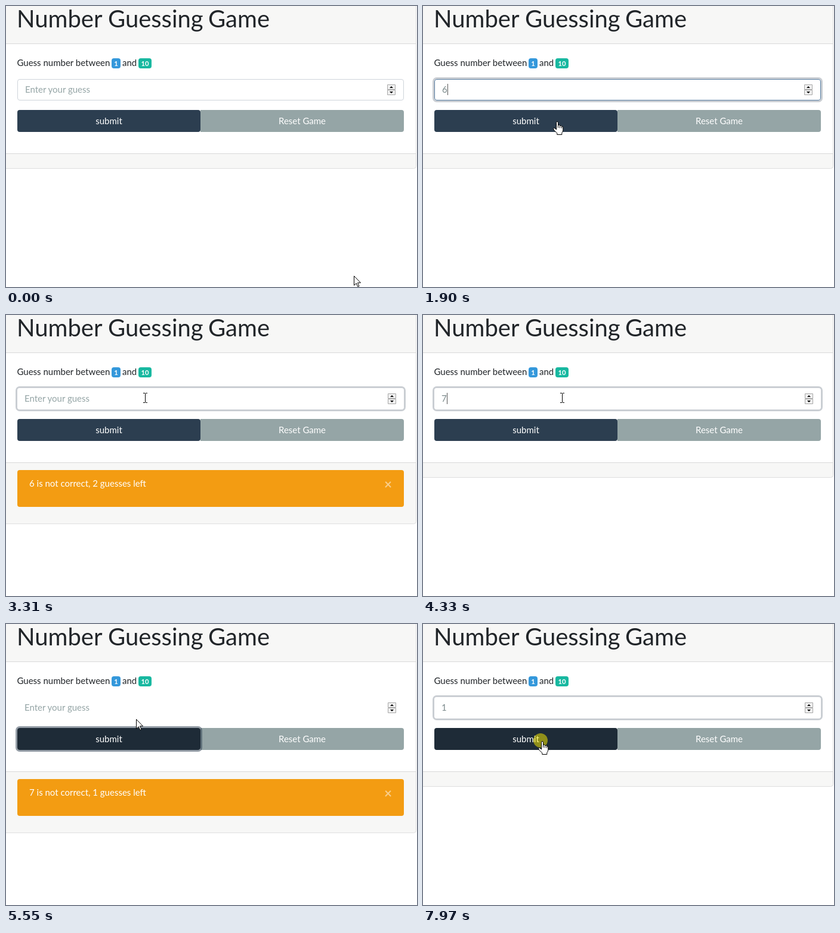
Write an HTML page that moves like this. It is 689 px wide and 473 px high and loops after 8 s.

```html
<!DOCTYPE html>
<html lang="en">
<head>
<meta charset="utf-8">
<title>Number Guessing Game</title>
<style>
  html, body { margin: 0; height: 100%; overflow: hidden; background: #fff; }
  svg { display: block; font: 15px Lato, sans-serif; fill: #212529; }
  .title { font-size: 40px; }
  .badge { font-size: 11.25px; font-weight: 700; }
  .close { font-size: 22.5px; font-weight: 700; opacity: .5; }
  .light { fill: #fff; }
  .mid { text-anchor: middle; }
  .ring { fill: none; stroke: #2c3e50; stroke-width: 3; }
  .cursor { fill: #fff; stroke: #000; stroke-linejoin: round; }
</style>
</head>
<body>
<svg width="689" height="473" viewBox="0 0 689 473">
  <rect id="card" x="-10" y="-20" width="697.5" rx="4" fill="#f7f7f6" stroke="#dfdfdf"/>
  <path d="M0 63.5H687M0 248.5H687" stroke="#d9d9d9"/>
  <rect y="64" width="687" height="184" fill="#fff"/>

  <g class="title">
    <text x="18" y="36">Number</text>
    <text x="171" y="36">Guessing</text>
    <text x="339" y="36">Game</text>
  </g>

  <text x="18.5" y="101">Guess number between</text>
  <rect x="177" y="88" width="15" height="17" rx="4" fill="#3498db"/>
  <text class="badge light mid" x="184.5" y="101">1</text>
  <text x="195" y="101">and</text>
  <rect x="222" y="88" width="22" height="17" rx="4" fill="#18b8a0"/>
  <text class="badge light mid" x="233" y="101">10</text>

  <rect id="inputRing" class="ring" x="17.5" y="121.5" width="651" height="39" rx="5.5"/>
  <rect id="box" x="19.5" y="123.5" width="647" height="35" rx="3.5" fill="#fff"/>
  <g id="field">
    <text id="entry" x="32" y="146"></text>
    <rect id="caret" y="131" width="1" height="19" fill="#555"/>
    <g fill="#f0f0f0" stroke="#a8a8a8">
      <path d="M639.5 132.5h13v8h-13zM639.5 141.5h13v8h-13z"/>
    </g>
    <path d="M643 138h6l-3-3zM643 144h6l-3 3z" fill="#000"/>
  </g>

  <path d="M326 175h337a4 4 0 0 1 4 4v29a4 4 0 0 1 -4 4h-337z" fill="#95a5a6"/>
  <text class="light mid" x="496.5" y="199">Reset Game</text>
  <rect id="btnRing" class="ring" x="17.5" y="173.5" width="310" height="40" rx="5.5"/>
  <rect id="btn" x="19" y="175" width="307" height="37" rx="4"/>
  <text class="light mid" x="172.5" y="199">submit</text>

  <g id="alert">
    <rect x="19" y="261" width="648" height="62" rx="4" fill="#f39c12"/>
    <text id="message" class="light" x="39" y="289"></text>
    <text class="close light mid" x="640.5" y="293">×</text>
  </g>

  <circle id="click" r="12" fill="#faeb00" fill-opacity=".52"/>
  <g id="arrow" class="cursor">
    <path d="M.5 .5V16.2L4.2 12.8L6.8 18.5L9 17.5L6.5 11.9H11.5Z"/>
  </g>
  <g id="beam" stroke="#000" fill="none">
    <path d="M-3 -7.5H0M1 -7.5H4M-3 8.5H0M1 8.5H4M.5 -7V8"/>
  </g>
  <g id="hand" class="cursor">
    <path transform="translate(-4 1)" d="M5.5 13V2.5q0-2 1.5-2t1.5 2V6.5q3-1 3 1q3-.8 3 1.2q2.3-.5 2.3 1.8V14.500q0 3-2 5v3h-8v-2.500L2 15.500q-2-3-1-4t4.500 2.500zM8.500 6.500v4.500M11.500 7.500v4M14.500 8.700v3"/>
  </g>
</svg>
<script>
const LOOP = 8000, STEP = 76.5, FADE = 150;
const $ = id => document.getElementById(id);
const within = (t, spans) => spans.find(([from, to]) => t >= from && t < to);
const show = (id, on) => $(id).style.display = on ? '' : 'none';
const easeOut = u => 1 - (1 - u) ** 3;
const smooth = u => u * u * (3 - 2 * u);

// start time, number of steps, end point, easing
const moves = [
  [70, 7, 231, 141, smooth],
  [1830, 1, 227, 168], [1900, 1, 222, 193], [1980, 1, 222, 195],
  [2360, 4, 233, 139],
  [4400, 4, 221, 187],
  [5550, 1, 218, 160], [5630, 3, 219, 147],
  [7510, 3, 197, 196]
];
const clicks = [600, 2130, 2760, 4790, 5940, 7970].map(t => [t, t + FADE]);
const inputFocus = [[600, 2130], [2760, 4790], [5940, 9000]];
const btnFocus = [[2130, 2760], [4790, 5940]];
const carets = [[600, 1210], [1740, 2130], [2760, 3310], [3840, 4400], [5940, 6490], [7020, 7585]];
const entries = [[1670, 2280, 6], [4160, 4870, 7], [7340, 9000, 1]];
const alerts = [[2280, 4330, 6, 2], [4870, 6870, 7, 1]];

function pointer(t) {
  let x = 583, y = 454;
  for (const [start, steps, toX, toY, ease = easeOut] of moves) {
    if (t < start) break;
    const done = Math.min(steps, Math.floor((t - start + 8) / STEP) + 1);
    const u = ease(done / steps);
    x += (toX - x) * u;
    y += (toY - y) * u;
  }
  return [Math.round(x), Math.round(y)];
}

const inside = ([x, y], left, top, right, bottom) =>
  x >= left && x < right && y >= top && y < bottom;

// Strength of a focus ring that fades in and out
function glow(t, spans) {
  return Math.max(0, ...spans.map(([from, to]) =>
    Math.min(1, (t - from) / FADE, 1 - (t - to) / FADE)));
}

function draw(t) {
  const alert = within(t, alerts);
  show('alert', alert);
  if (alert) $('message').textContent = `${alert[2]} is not correct, ${alert[3]} guesses left`;
  $('card').setAttribute('height', alert ? 371.5 : 293.5);

  const entry = within(t, entries);
  const plain = t >= 2280;
  $('entry').textContent = entry ? entry[2] : 'Enter your guess';
  $('entry').style.fill = entry ? '#7b8a8b' : '#95a5a6';
  $('field').setAttribute('transform', `translate(${plain ? -1 : 0} 0)`);
  $('field').lastElementChild.setAttribute('transform', `translate(${plain ? 2 : 0} 0)`);
  $('field').children[2].setAttribute('transform', `translate(${plain ? 2 : 0} 0)`);
  $('caret').setAttribute('x', entry ? 41 : 32);
  show('caret', within(t, carets));
  $('box').style.stroke = plain ? '#fff' : within(t, inputFocus) ? '#597ea2' : '#ced4da';
  $('inputRing').style.strokeOpacity = .25 * glow(t, inputFocus);
  $('btnRing').style.strokeOpacity = .5 * glow(t, btnFocus);

  const hot = pointer(t);
  const overButton = p => inside(p, 19, 175, 326, 212);
  $('btn').style.fill = overButton(pointer(t - 76)) ? '#1e2b37' : '#2c3e50';
  const shape = inside(hot, 19, 123, 667, 159) ? 'beam'
    : inside(hot, 19, 175, 667, 212) ? 'hand' : 'arrow';
  for (const id of ['arrow', 'beam', 'hand']) show(id, id === shape);
  for (const id of [shape, 'click']) $(id).setAttribute('transform', `translate(${hot})`);
  show('click', within(t, clicks));
}

const begin = performance.now();
function tick() {
  draw((performance.now() - begin) % LOOP);
  requestAnimationFrame(tick);
}
tick();
</script>
</body>
</html>
```
